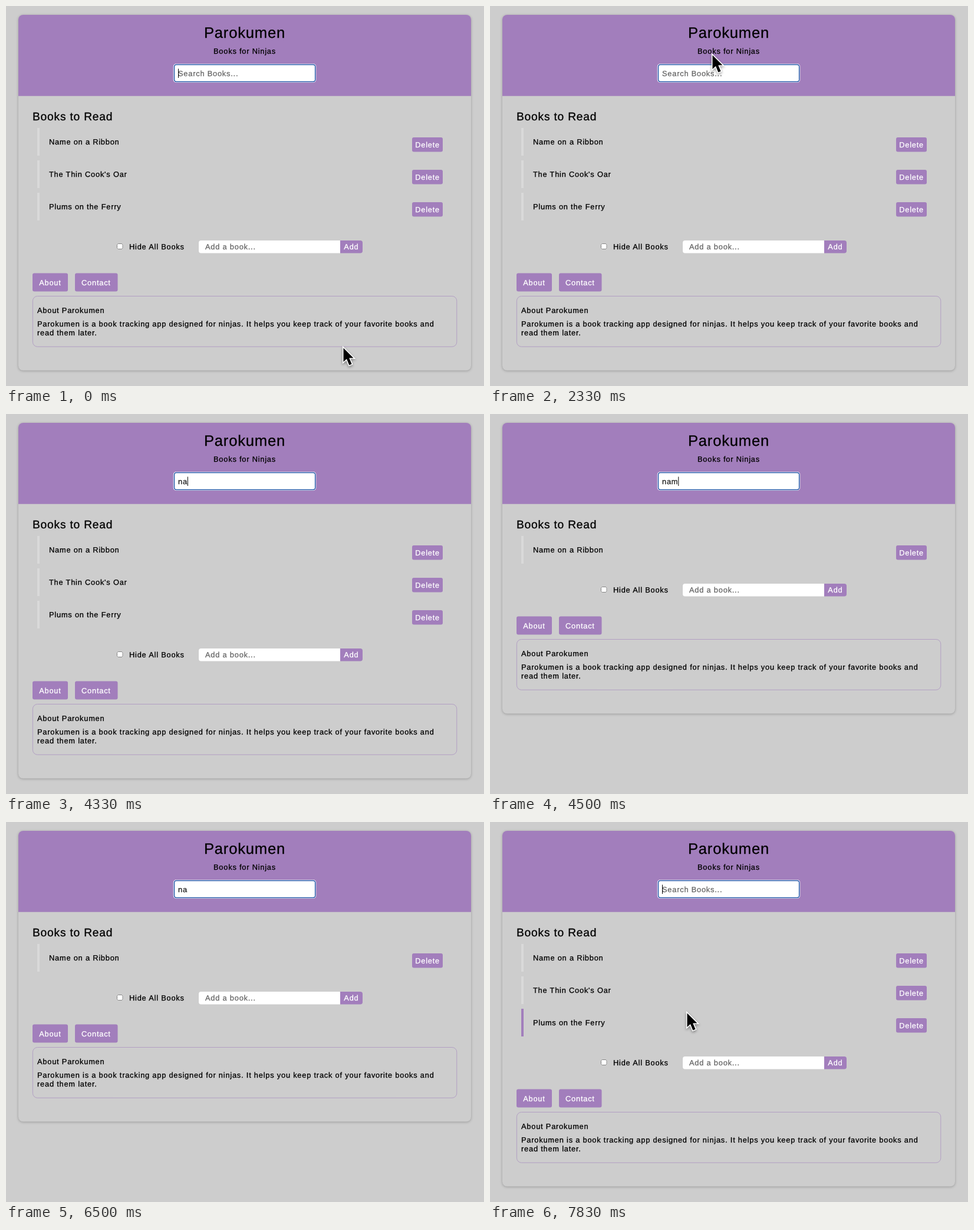
These frames come from a looping animation (811x645 px, 8000 ms). An HTML page with a canvas:

```html
<!DOCTYPE html>
<html lang="en">
<head>
<meta charset="utf-8">
<title>Reading list</title>
<style>
  html, body { margin: 0; width: 100%; height: 100%; overflow: hidden; background: #cdcdcd; }
  canvas { display: block; width: 811px; height: 645px; }
</style>
</head>
<body>
<canvas id="stage" width="811" height="645"></canvas>
<script>
const ctx = document.getElementById('stage').getContext('2d');
const LOOP = 8000;
const GREY = '#cdcdcd', PURPLE = '#a27ebc', FAINT = '#d9d9d9', HINT = '#666', EDGE = '#ab94c0';
const APP = 'Parokumen';
const BOOKS = ['Name on a Ribbon', "The Thin Cook's Oar", 'Plums on the Ferry'];
const ROW = 55;

// Search field: start time, typed text, caret visible
const TYPING = [
  [0, '', true], [2330, '', false], [2830, '', true],
  [3500, 'n', true], [4000, 'n', false], [4330, 'na', true],
  [4500, 'nam', true], [4670, 'name', true], [5170, 'name', false],
  [5330, 'name ', true], [5500, 'name o', true], [5670, 'name on', true],
  [6170, 'name o', false], [6330, 'name', true], [6500, 'na', false],
  [6670, 'n', true], [6830, '', true], [7170, '', false], [7670, '', true]
];

// Pointer: start time, position (none while typing), hovered row
const POINTER = [
  [0, 571, 577], [170, 452, 272], [330, 376, 80],
  [3500], [7670, 354, 275, 1], [7830, 333, 321, 2]
];

const FILTER_ON = 4500, FILTER_OFF = 6670;

const at = (track, t) => track.findLast(step => step[0] <= t);

function box(x, y, w, h, r, fill) {
  ctx.beginPath();
  ctx.roundRect(x, y, w, h, r);
  ctx.fillStyle = fill;
  ctx.fill();
}

function frame(x, y, w, h, r, color, width) {
  ctx.beginPath();
  ctx.roundRect(x, y, w, h, r);
  ctx.strokeStyle = color;
  ctx.lineWidth = width;
  ctx.stroke();
}

// The hairline stroke gives the slightly heavier weight of smoothed screen text
function text(str, x, y, { size = 12.8, color = '#000', align = 'left' } = {}) {
  ctx.font = `${size}px "Liberation Sans", Arial, sans-serif`;
  ctx.letterSpacing = '0.8px';
  ctx.textRendering = 'geometricPrecision';
  ctx.textAlign = align;
  ctx.fillStyle = ctx.strokeStyle = color;
  ctx.lineWidth = 0.3;
  ctx.lineJoin = 'round';
  ctx.fillText(str, x, y);
  ctx.strokeText(str, x, y);
  return ctx.measureText(str).width;
}

function button(label, x, y, w, h, padX, baseline, r = 3) {
  box(x, y, w, h, r, PURPLE);
  text(label, x + padX, y + baseline, { color: '#fff' });
}

function card(height) {
  ctx.save();
  ctx.shadowColor = 'rgba(0,0,0,0.25)';
  ctx.shadowBlur = 4;
  ctx.shadowOffsetY = 1;
  box(21, 15, 768, height, 8, GREY);
  ctx.restore();
}

function header(query, caret) {
  box(21, 15, 768, 137.8, [8, 8, 0, 0], PURPLE);
  text(APP, 405, 54.4, { size: 25.6, align: 'center' });
  text('Books for Ninjas', 405, 80.5, { align: 'center' });

  box(283.8, 98, 242.4, 32, 5, '#fff');
  frame(285.5, 99.6, 239.2, 28.8, 3.5, '#2354a6', 1.5);
  let end = 292;
  if (query) end += text(query, 292, 118.5, { color: '#222' });
  else text('Search Books...', 292, 118.5, { color: HINT });
  if (caret) {
    ctx.fillStyle = '#000';
    ctx.fillRect(end, 106.5, 1, 15.5);
  }
}

function list(books, hovered) {
  text('Books to Read', 45, 194.3, { size: 19.2 });
  books.forEach((title, i) => {
    const y = 207 + i * ROW;
    box(53, y, 4, 47, 0, i === hovered ? PURPLE : FAINT);
    text(title, 73, y + 28);
    button('Delete', 689, y + 16, 52, 24.5, 5.2, 17);
  });
}

function controls() {
  box(188, 403, 10.5, 10, 2, '#fff');
  frame(188.5, 403.5, 9.5, 9, 2, '#767676', 0.9);
  text('Hide All Books', 209, 413);
  box(327, 398, 240, 21.5, [4, 0, 0, 4], '#fff');
  text('Add a book...', 338, 413, { color: HINT });
  button('Add', 567, 398, 38, 21.5, 6.3, 15, [0, 4, 4, 0]);
}

function tabs() {
  button('About', 45, 453.5, 60, 31, 11.2, 20.3);
  button('Contact', 117, 453.5, 72.5, 31, 11, 20.3);
  frame(45.4, 492.5, 719.4, 85.8, 8, EDGE, 0.8);
  text('About ' + APP, 53, 521.2);
  text(APP + ' is a book tracking app designed for ninjas. ' +
    'It helps you keep track of your favorite books and', 53, 544);
  text('read them later.', 53, 559);
}

function arrow(x, y) {
  const points = [[1.5, 3.5], [1.5, 27], [7, 22], [11.3, 32.5], [15.6, 30.7], [11.2, 20.4], [18.5, 20.4]];
  ctx.save();
  ctx.translate(x, y);
  ctx.beginPath();
  for (const p of points) ctx.lineTo(...p);
  ctx.closePath();
  ctx.shadowColor = 'rgba(0,0,0,0.4)';
  ctx.shadowBlur = 4;
  ctx.shadowOffsetY = 2;
  ctx.strokeStyle = '#fff';
  ctx.lineWidth = 3.2;
  ctx.lineJoin = 'miter';
  ctx.stroke();
  ctx.shadowColor = 'transparent';
  ctx.fillStyle = '#000';
  ctx.fill();
  ctx.restore();
}

function draw(t) {
  const [, query, caret] = at(TYPING, t);
  const [, px, py, hovered] = at(POINTER, t);
  const filtered = t >= FILTER_ON && t < FILTER_OFF;
  const books = filtered ? BOOKS.filter(b => b.toLowerCase().includes(query)) : BOOKS;
  const lift = (BOOKS.length - books.length) * ROW;

  ctx.fillStyle = GREY;
  ctx.fillRect(0, 0, 811, 645);
  card(603.5 - lift);
  header(query, caret);
  list(books, hovered);
  ctx.save();
  ctx.translate(0, -lift);
  controls();
  tabs();
  ctx.restore();
  if (px !== undefined) arrow(px, py);
}

const start = performance.now();
function tick() {
  draw((performance.now() - start) % LOOP);
  requestAnimationFrame(tick);
}
tick();
</script>
</body>
</html>
```
